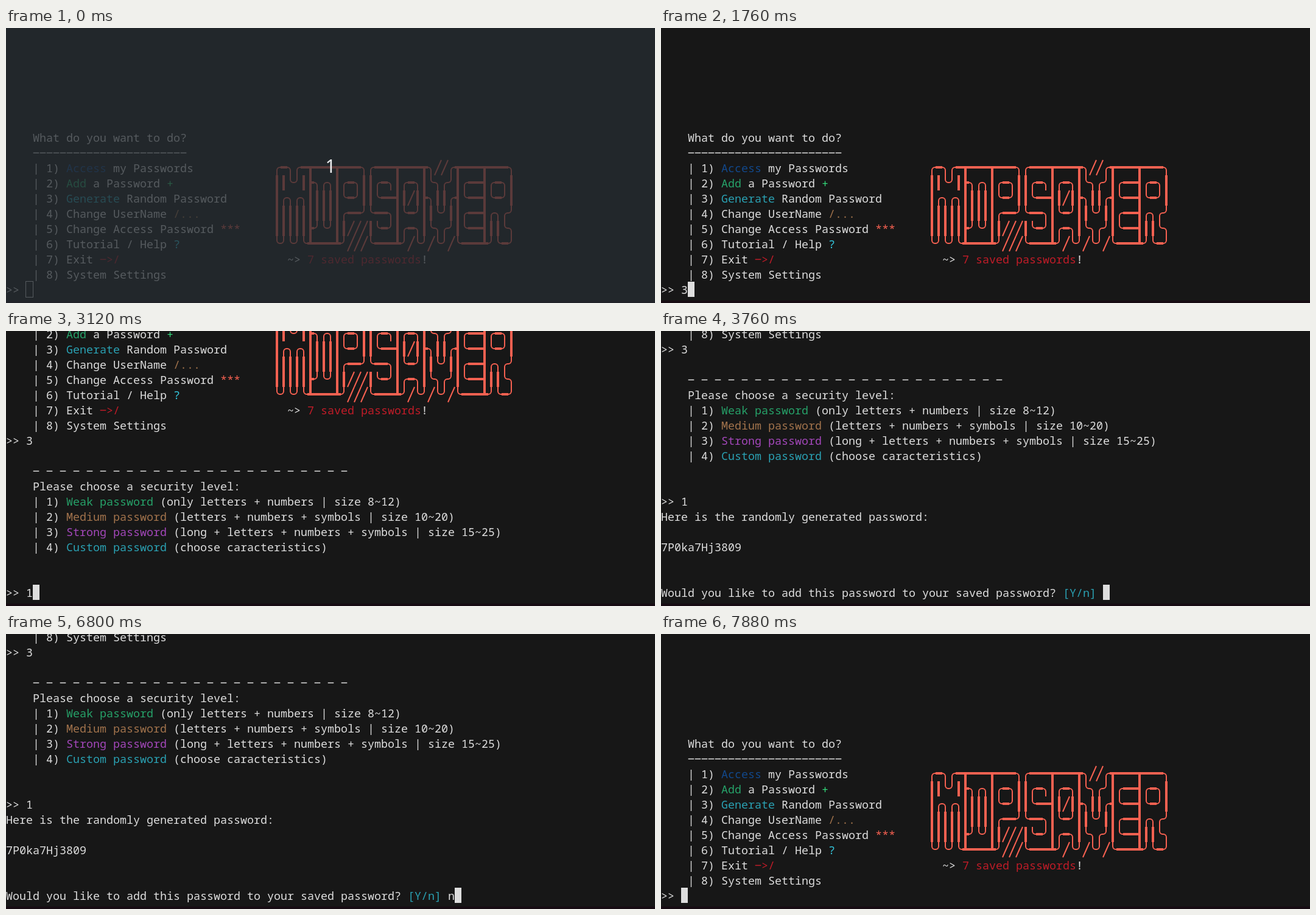
Recreate the animation shown at these times as an HTML page with a canvas. Size 1066x452 px, loop 8000 ms.

```html
<!DOCTYPE html>
<html lang="en">
<head>
<meta charset="utf-8">
<title>Password manager in a terminal</title>
<style>
  html, body { margin: 0; width: 100%; height: 100%; overflow: hidden; background: #171717; }
  canvas { display: block; }
</style>
</head>
<body>
<canvas id="stage" width="1066" height="452"></canvas>
<script>
const ctx = document.getElementById('stage').getContext('2d');
const LOOP = 8000;
const CELL_W = 11, CELL_H = 25, TOP = -8, BASELINE = 20;
const INPUT_ROW = 17;
const COLORS = {
  w: '#dedede', r: '#c01c28', g: '#26a269', y: '#a2734c', b: '#12488b',
  m: '#a347ba', c: '#2aa1b3', R: '#f66151', G: '#33da7a', C: '#33c7de'
};

// Coloured words are written as {colour:text}.
const LINES = [
  '', '', '', '', '', '', '',
  '    What do you want to do?',
  '    ' + '-'.repeat(23),
  '    | 1) {b:Access} my Passwords',
  '    | 2) {g:Add} a Password {G:+}',
  '    | 3) {c:Generate} Random Password',
  '    | 4) Change UserName {y:/...}',
  '    | 5) Change Access Password {R:***}',
  '    | 6) Tutorial / Help {C:?}',
  '    | 7) Exit {r:->/}' + ' '.repeat(25) + '~> {r:7 saved passwords}!',
  '    | 8) System Settings',
  '>> 3',
  '',
  '    ' + '- '.repeat(24),
  '    Please choose a security level:',
  '    | 1) {g:Weak password} (only letters + numbers | size 8~12)',
  '    | 2) {y:Medium password} (letters + numbers + symbols | size 10~20)',
  '    | 3) {m:Strong password} (long + letters + numbers + symbols | size 15~25)',
  '    | 4) {c:Custom password} (choose caracteristics)',
  '', '',
  '>> 1',
  'Here is the randomly generated password:',
  '',
  '7P0ka7Hj3809',
  '', ''
];

const BANNER_COL = 40, BANNER_LINE = 9;
const BANNER = [
  '╭━╮╭━┳━━━┳━━━╮╭━━━┳━━━┳╮╱╱╭┳━━━┳━━━╮',
  '┃┃╰╯┃┣╮╭╮┃╭━╮┃┃╭━╮┃╭━╮┃╰╮╭╯┃╭━━┫╭━╮┃',
  '┃╭╮╭╮┃┃┃┃┃╰━╯┃┃╰━━┫┃╱┃┣╮┃┃╭┫╰━━┫╰━╯┃',
  '┃┃┃┃┃┃┃┃┃┃╭━━╯╰━━╮┃╰━╯┃┃╰╯┃┃╭━━┫╭╮╭╯',
  '┃┃┃┃┃┣╯╰╯┃┃╱╱╱┃╰━╯┃╭━╮┃╰╮╭╯┃╰━━┫┃┃╰╮',
  '╰╯╰╯╰┻━━━┻╯╱╱╱╰━━━┻╯╱╰╯╱╰╯╱╰━━━┻╯╰━╯'
];

// Directions in which each box character leaves the cell centre.
const HEAVY = { '━': 'lr', '┃': 'ud', '┳': 'lrd', '┻': 'lru', '┣': 'udr', '┫': 'udl' };
const ROUND = { '╭': 'dr', '╮': 'dl', '╰': 'ur', '╯': 'ul' };

const ASK = 'Would you like to add this password to your saved password? {c:[Y/n]} ';

// Start time, lines scrolled away, text of the input row, cursor style.
const STEPS = [
  [0, 0, '>> ', 'hollow'],
  [80, 0, '>> ', 'block'],
  [600, 0, '>> 3', 'block'],
  [1160, 0, '>> 3', 'off'],
  [1760, 0, '>> 3', 'block'],
  [1800, 10, '>> ', 'block'],
  [2360, 10, '>> ', 'off'],
  [2800, 10, '>> ', 'block'],
  [3120, 10, '>> 1', 'block'],
  [3640, 11, '', 'block'],
  [3720, 14, '', 'block'],
  [3760, 16, ASK, 'block'],
  [4320, 16, ASK, 'off'],
  [4920, 16, ASK, 'block'],
  [5520, 16, ASK, 'off'],
  [5680, 16, ASK, 'block'],
  [5720, 16, ASK + 'n', 'block'],
  [6280, 16, ASK + 'n', 'off'],
  [6800, 16, ASK + 'n', 'block'],
  [6840, 0, '>> ', 'block'],
  [7440, 0, '>> ', 'off'],
  [7880, 0, '>> ', 'block']
];

const rowTop = row => TOP + row * CELL_H;

function drawChar(ch, x, y) {
  if (ch === '-') ctx.fillRect(x + 0.7, y + 12.6, 9.6, 1.5);
  else if (ch !== ' ') ctx.fillText(ch, x, y + BASELINE);
}

// Returns the column after the last character.
function drawLine(line, row) {
  let col = 0;
  for (const [, color, word, plain] of line.matchAll(/\{(\w):([^}]*)\}|([^{]+)/g)) {
    ctx.fillStyle = COLORS[color || 'w'];
    for (const ch of word || plain) drawChar(ch, col++ * CELL_W, rowTop(row));
  }
  return col;
}

function drawBoxChar(ch, x, y) {
  const cx = x + 5, cy = y + 12;
  if (HEAVY[ch]) {
    for (const dir of HEAVY[ch]) {
      if (dir === 'l') ctx.fillRect(x, cy - 2, 7, 4);
      if (dir === 'r') ctx.fillRect(cx - 2, cy - 2, 8, 4);
      if (dir === 'u') ctx.fillRect(cx - 2, y, 4, 14);
      if (dir === 'd') ctx.fillRect(cx - 2, cy - 2, 4, 15);
    }
    return;
  }
  ctx.beginPath();
  if (ROUND[ch]) {
    const [vertical, side] = ROUND[ch];
    const endX = side === 'r' ? x + CELL_W : x;
    ctx.moveTo(cx, vertical === 'd' ? y + CELL_H : y);
    ctx.arcTo(cx, cy, endX, cy, 5);
    ctx.lineTo(endX, cy);
  } else {
    ctx.moveTo(x, y + CELL_H);
    ctx.lineTo(x + CELL_W, y);
  }
  ctx.stroke();
}

function drawBanner(scroll) {
  ctx.fillStyle = ctx.strokeStyle = COLORS.R;
  ctx.lineWidth = 2;
  BANNER.forEach((line, i) => {
    const y = rowTop(BANNER_LINE + i - scroll);
    [...line].forEach((ch, j) => drawBoxChar(ch, (BANNER_COL + j) * CELL_W, y));
  });
}

function drawCursor(style, col) {
  const x = col * CELL_W, y = rowTop(INPUT_ROW);
  if (style === 'block') {
    ctx.fillStyle = COLORS.w;
    ctx.fillRect(x, y, CELL_W, CELL_H);
  } else if (style === 'hollow') {
    ctx.strokeStyle = COLORS.w;
    ctx.lineWidth = 1;
    ctx.strokeRect(x - 0.5, y - 0.5, CELL_W + 1, CELL_H + 1);
  }
}

function drawCountdown() {
  ctx.fillStyle = 'rgba(39, 45, 50, 0.74)';
  ctx.fillRect(0, 0, 1066, 452);
  ctx.fillStyle = '#eceef0';
  ctx.font = '30px "Noto Sans", sans-serif';
  ctx.textAlign = 'center';
  ctx.fillText('1', 533, 238);
}

function draw(time) {
  const [, scroll, input, cursor] = STEPS.findLast(step => step[0] <= time);
  ctx.fillStyle = '#171717';
  ctx.fillRect(0, 0, 1066, 452);
  ctx.font = '18.333px "Noto Sans Mono", monospace';
  ctx.textAlign = 'left';
  for (let row = 0; row < INPUT_ROW; row++) drawLine(LINES[scroll + row], row);
  drawBanner(scroll);
  drawCursor(cursor, drawLine(input, INPUT_ROW));
  ctx.fillStyle = '#170c13';
  ctx.fillRect(0, 448, 1066, 4);
  if (time < 40) drawCountdown();
}

const start = performance.now();
function tick() {
  draw((performance.now() - start) % LOOP);
  requestAnimationFrame(tick);
}
tick();
</script>
</body>
</html>
```
